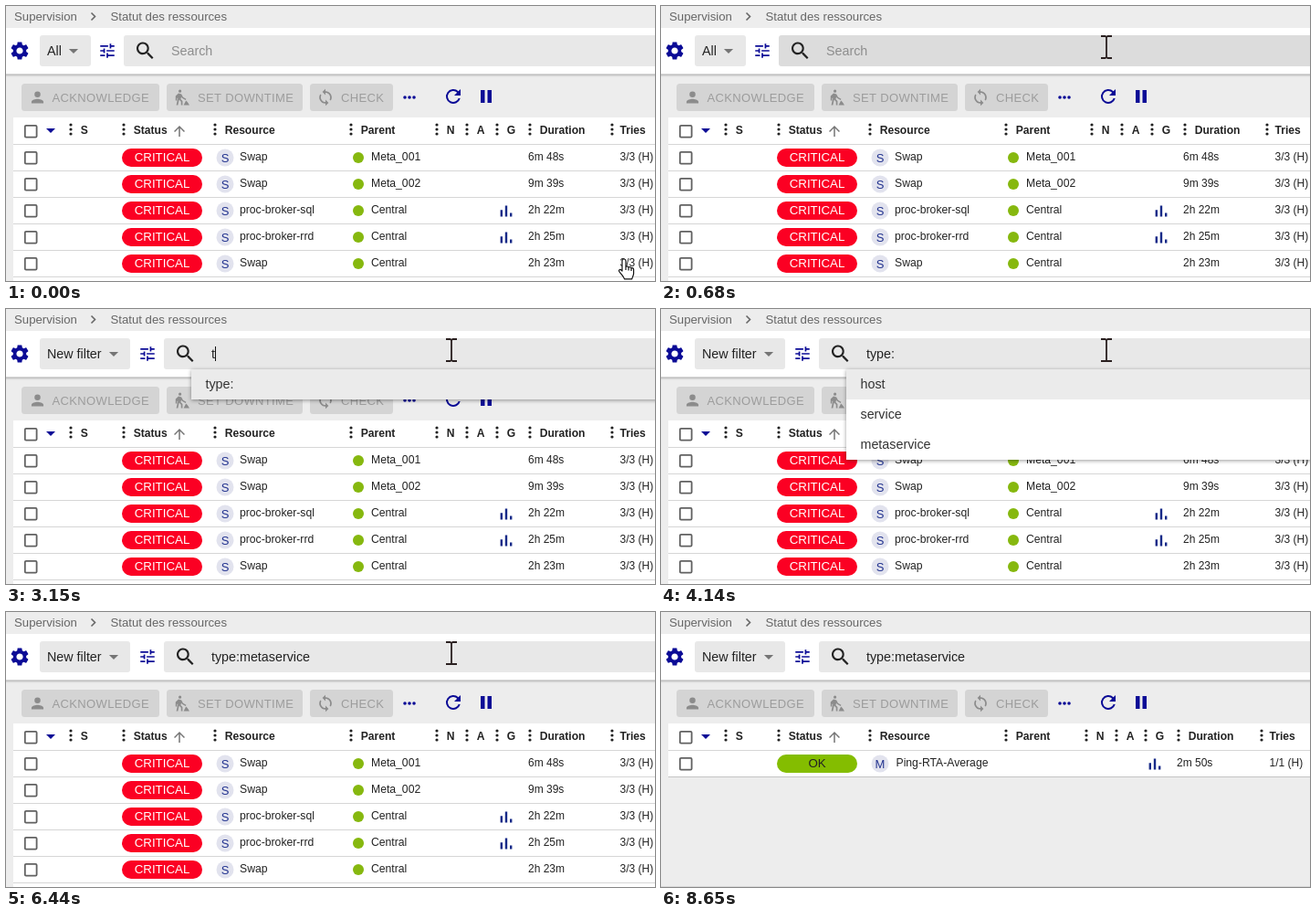
Write an HTML page that moves like this. It is 711 px wide and 301 px high and loops after 8720 ms.

```html
<!DOCTYPE html>
<html lang="fr">
<head>
<meta charset="utf-8">
<title>Statut des ressources</title>
<style>
  html, body { margin: 0; width: 100%; height: 100%; overflow: hidden; background: #ededed; }
  svg { display: block; font-family: "Liberation Sans", Arial, sans-serif; }
  text { white-space: pre; }
  .menu { filter: drop-shadow(0 1px 2px rgba(0, 0, 0, .4)); }
</style>
</head>
<body>
<svg id="stage" width="711" height="301" viewBox="0 0 711 301"></svg>
<script>
const NAVY = '#0b0b96', INK = '#222', GREEN = '#84bd00', RED = '#fb0023', FIELD = '#e8e8e8';
const LOOP = 8720;

const ICONS = {
  gear: 'M19.14 12.94c.04-.3.06-.61.06-.94 0-.32-.02-.64-.07-.94l2.03-1.58c.18-.14.23-.41.12-.61l-1.92-3.32c-.12-.22-.37-.29-.59-.22l-2.39.96c-.5-.38-1.03-.7-1.62-.94l-.36-2.54c-.04-.24-.24-.41-.48-.41h-3.84c-.24 0-.43.17-.47.41l-.36 2.54c-.59.24-1.13.57-1.62.94l-2.39-.96c-.22-.08-.47 0-.59.22L2.74 8.87c-.12.21-.08.47.12.61l2.03 1.58c-.05.3-.09.63-.09.94s.02.64.07.94l-2.03 1.58c-.18.14-.23.41-.12.61l1.92 3.32c.12.22.37.29.59.22l2.39-.96c.5.38 1.03.7 1.62.94l.36 2.54c.05.24.24.41.48.41h3.84c.24 0 .44-.17.47-.41l.36-2.54c.59-.24 1.13-.56 1.62-.94l2.39.96c.22.08.47 0 .59-.22l1.92-3.32c.12-.22.07-.47-.12-.61zM12 15.6c-1.98 0-3.6-1.62-3.6-3.6s1.62-3.6 3.6-3.6 3.6 1.62 3.6 3.6-1.62 3.6-3.6 3.6z',
  tune: 'M3 17v2h6v-2zM3 5v2h10V5zm10 16v-2h8v-2h-8v-2h-2v6zM7 9v2H3v2h4v2h2V9zm14 4v-2H11v2zm-6-4h2V7h4V5h-4V3h-2z',
  search: 'M15.5 14h-.79l-.28-.27A6.5 6.5 0 1 0 13.73 14.43l.27.28v.79l5 4.99L20.49 19zm-6 0a4.5 4.5 0 1 1 0-9 4.5 4.5 0 0 1 0 9z',
  person: 'M12 12a4 4 0 1 0 0-8 4 4 0 0 0 0 8zm0 2c-2.67 0-8 1.34-8 4v2h16v-2c0-2.66-5.33-4-8-4z',
  digger: 'M9 1.5a2 2 0 1 1 0 4 2 2 0 0 1 0-4zM7 6.5l4 1.2 2.2 4 4.3 2.4-.8 1.5-4.9-2.6-1-1.6-.8 3 2.5 2.6v5.5H10.500v-4.700l-2.7-2.600-1.600 7.300H4l2.2-10-1.2.8v3.200H3V10.200zM14 22.500l3.200-6 2 1.800 2.800 4.200z',
  sync: 'M12 4V1L8 5l4 4V6c3.31 0 6 2.69 6 6 0 1.01-.25 1.97-.7 2.8l1.46 1.46A8 8 0 0 0 12 4zm0 14c-3.31 0-6-2.69-6-6 0-1.01.25-1.97.7-2.8L5.24 7.74A8 8 0 0 0 12 20v3l4-4-4-4z',
  refresh: 'M17.65 6.35A8 8 0 1 0 19.73 14h-2.08A6 6 0 1 1 16.22 7.78L13 11h7V4z',
  pause: 'M6 19h4.500V5H6zm7.500-14v14H18V5z',
  up: 'M4 12l1.41 1.41L11 7.83V20h2V7.83l5.58 5.59L20 12l-8-8z',
  down: 'M6 9.500h12l-6 6z',
  chart: 'M4 20V11h3v9zM10.500 20V5h3v15zM17 20v-5h3v5z'
};

const stage = document.getElementById('stage');

function add(parent, tag, attrs, text) {
  const node = document.createElementNS('http://www.w3.org/2000/svg', tag);
  for (const key in attrs) node.setAttribute(key, attrs[key]);
  if (text !== undefined) node.textContent = text;
  return parent.appendChild(node);
}
const group = (parent, attrs = {}) => add(parent, 'g', attrs);
const box = (p, x, y, width, height, fill, more) => add(p, 'rect', { x, y, width, height, fill, ...more });
const dot = (p, cx, cy, r, fill) => add(p, 'circle', { cx, cy, r, fill });
const label = (p, x, y, str, size, fill = INK, more) =>
  add(p, 'text', { x, y, 'font-size': size, fill, ...more }, str);
const icon = (p, name, cx, cy, scale, fill = NAVY) =>
  add(p, 'path', { d: ICONS[name], fill, transform: `translate(${cx} ${cy}) scale(${scale}) translate(-12 -12)` });
const show = (node, on) => node.setAttribute('visibility', on ? 'visible' : 'hidden');

// Breadcrumb and filter bar
box(stage, 0, 0, 711, 301, '#ededed');
label(stage, 9, 16, 'Supervision', 13.2, '#666');
add(stage, 'path', { d: 'M93.500 7.500l4 4-4 4', fill: 'none', stroke: '#666', 'stroke-width': 1.6 });
label(stage, 114.500, 16, 'Statut des ressources', 13.2, '#666');
box(stage, 0, 24, 711, 50.500, '#fff');
['.26', '.12', '.05'].forEach((a, i) => box(stage, 0, 74.500 + i, 711, 1, `rgba(0,0,0,${a})`));
icon(stage, 'gear', 15, 49, 1);

const select = box(stage, 37, 32, 56, 34, FIELD, { rx: 3 });
const filterName = label(stage, 45, 54, 'All', 14.300);
const filterArrow = group(stage);
icon(filterArrow, 'down', 74, 49, .85, '#757575');
const bar = group(stage);
icon(bar, 'tune', 111, 49, .86);
const field = box(bar, 129, 32, 590, 34, FIELD, { rx: 3 });
icon(bar, 'search', 152.500, 49, 1.06, INK);
const query = label(bar, 181, 54, '', 14.300);
const caret = box(stage, 181, 41, 1, 16, '#111');

// Action buttons
[[17, 151, 'person', 34.500, 'ACKNOWLEDGE', 50.500, .82],
 [176, 149, 'digger', 193, 'SET DOWNTIME', 210, .8],
 [333, 91, 'sync', 350, 'CHECK', 367, .85]].forEach(([x, w, name, ix, str, tx, scale]) => {
  box(stage, x, 85, w, 30, '#d4d4d4', { rx: 3.500 });
  icon(stage, name, ix, 100, scale, '#8c8c8c');
  label(stage, tx, 104.500, str, 13, '#9c9c9c', { 'letter-spacing': .37 });
});
[437, 442, 447].forEach(x => dot(stage, x, 100, 1.8, NAVY));
icon(stage, 'refresh', 490, 99, 1);
icon(stage, 'pause', 526, 99, 1);

// Tables: the right-hand columns sit further left when filtered
function checkbox(p, y) {
  box(p, 20.800, y - 6.200, 12.800, 12.800, 'none', { rx: 1.200, stroke: '#616161', 'stroke-width': 1.800 });
}

function table(rows, cols) {
  const g = group(stage), [n, a, gr, dur, tries] = cols;
  box(g, 8, 122, 703, rows.length > 1 ? 179 : 59, '#fff');
  checkbox(g, 137);
  add(g, 'path', { d: 'M44 134h10l-5 5z', fill: NAVY });
  [[71, 'S'], [129, 'Status'], [229, 'Resource'], [378, 'Parent'], [n, 'N'], [a, 'A'],
   [gr, 'G'], [dur, 'Duration'], [tries, 'Tries']].forEach(([x, str]) => {
    [130, 135, 140].forEach(y => dot(g, x, y, 1.600, INK));
    label(g, x + (x > 650 ? 8.500 : 10.700), 140, str, 12.100, INK, { 'font-weight': 'bold' });
  });
  icon(g, 'up', 190, 137, .75, '#757575');
  rows.forEach(([status, kind, name, parent, chart, time, count], i) => {
    const y = 166 + i * 29;
    box(g, 8, y - 15, 703, 1, '#d6d6d6');
    checkbox(g, y);
    box(g, 127, y - 10, 88, 20, status === 'OK' ? GREEN : RED, { rx: 10 });
    label(g, 171, y + 4, status, 13.300, status === 'OK' ? INK : '#fff', { 'text-anchor': 'middle' });
    dot(g, 240, y, 9.500, '#e2e3ee');
    label(g, 240, y + 4.500, kind, 13, '#22338f', { 'text-anchor': 'middle' });
    label(g, parent ? 256 : 257.500, y + 2.500, name, 12.200);
    if (parent) {
      dot(g, 386, y, 6, '#86b80f');
      label(g, 400, y + 2.500, parent, 12.200);
    }
    if (chart) icon(g, 'chart', gr + 10, y, .8, '#172a88');
    label(g, dur - 2, y + 2.500, time, 12);
    label(g, tries + 8.500, y + 2.500, count, 12);
  });
  box(g, 8, 151 + rows.length * 29, 703, 1, rows.length > 1 ? '#d6d6d6' : '#c4c4c4');
  return g;
}

const alert = (name, parent, chart, time) => ['CRITICAL', 'S', name, parent, chart, time, '3/3 (H)'];
const fullTable = table([
  alert('Swap', 'Meta_001', false, '6m 48s'),
  alert('Swap', 'Meta_002', false, '9m 39s'),
  alert('proc-broker-sql', 'Central', true, '2h 22m'),
  alert('proc-broker-rrd', 'Central', true, '2h 25m'),
  alert('Swap', 'Central', false, '2h 23m')
], [472, 505, 538, 574, 664]);
const shortTable = table([
  ['OK', 'M', 'Ping-RTA-Average', '', true, '2m 50s', '1/1 (H)']
], [466, 499, 531, 567, 658]);
box(shortTable, 0, 300, 711, 1, '#d8d8d8');

// Suggestion list
function suggestions(items) {
  const g = group(stage, { class: 'menu' });
  box(g, 203, 66, 530, items.length * 33, '#fff');
  const mark = box(g, 203, 66, 530, 33, '#ebebeb');
  items.forEach((str, i) => label(g, 218.500, 87 + i * 33, str, 14.300, '#333'));
  return { g, mark };
}
const menus = [['type:'], ['host', 'service', 'metaservice'], [',host', ',service']].map(suggestions);

// Pointers, hot spot at 0,0
const pointers = {
  beam: group(stage),
  hand: group(stage),
  arrow: group(stage)
};
add(pointers.beam, 'path', {
  d: 'M-6-12h4.500L0-11 1.500-12H6M0-11V11M-6 12h4.500L0 11 1.500 12H6', fill: 'none', stroke: '#2a2020', 'stroke-width': 1.800
});
add(pointers.hand, 'path', {
  d: 'M-2 2a2 2 0 0 1 4 0v6.500a1.800 1.800 0 0 1 3 .6 1.800 1.800 0 0 1 3 1 1.600 1.600 0 0 1 2.600 1.200v4.500c0 2.200-1.400 3.400-1.900 6H.5C0 19.500-2.500 17-5.200 13.600c-1-1.600.9-3 2.200-1.600l1 1zM2 8v4M5 9v3.500M8 10v3',
  fill: '#fff', stroke: '#111', 'stroke-width': 1.200, 'stroke-linejoin': 'round'
});
add(pointers.arrow, 'path', {
  d: 'M0 0v17l4-3.700 2.600 6 2.600-1.100-2.600-5.900H12z', fill: '#fff', stroke: '#111', 'stroke-width': 1
});

// Timeline tables: [ms, values...]
const TYPED = [[0, 'Search', 181], [1940, 't', 229], [3220, 'type:', 256], [5170, 'type:metaservice', 332]];
const CARET = [[880, 1410], [1940, 2490], [3020, 3750], [4280, 4820], [5170, 5680], [6160, 6440]];
const MENU = [[0, -1, 0], [1940, 0, 0], [3220, 1, 0], [4210, 1, 1], [4540, 1, 2], [5170, 2, 0], [6440, -1, 0]];
const SHADE = [[0, 232], [470, 232], [670, 220], [880, 220], [1010, 232], [6440, 232], [6640, 220], [8030, 220], [8230, 232]];
const PATH = [[70, 677, 277], [540, 490, 35], [680, 488, 45], [7970, 488, 45], [8380, 668, 312]];

const stepAt = (list, t) => list.filter(s => s[0] <= t).pop();
const smooth = u => u * u * (3 - 2 * u);

function tween(list, t, ease = u => u) {
  const i = list.findIndex(s => s[0] > t);
  if (i < 0) return list[list.length - 1].slice(1);
  if (i === 0) return list[0].slice(1);
  const a = list[i - 1], b = list[i], u = ease((t - a[0]) / (b[0] - a[0]));
  return a.slice(1).map((v, k) => v + (b[k + 1] - v) * u);
}

function render(t) {
  const edited = t >= 1940, filtered = t >= 6590;

  select.setAttribute('width', edited ? 99 : 56);
  filterName.textContent = edited ? 'New filter' : 'All';
  filterArrow.setAttribute('transform', `translate(${edited ? 44 : 0} 0)`);
  bar.setAttribute('transform', `translate(${edited ? 44 : 0} 0)`);
  const shade = Math.round(tween(SHADE, t)[0]);
  field.setAttribute('fill', `rgb(${shade},${shade},${shade})`);

  const [, str, caretX] = stepAt(TYPED, t);
  query.textContent = str;
  query.setAttribute('fill', edited ? INK : '#8d8d8d');
  caret.setAttribute('x', caretX);
  show(caret, CARET.some(([on, off]) => t >= on && t < off));

  show(fullTable, !filtered);
  show(shortTable, filtered);
  const [, open, row] = stepAt(MENU, t);
  menus.forEach(({ g, mark }, i) => {
    show(g, i === open);
    mark.setAttribute('y', 66 + row * 33);
  });

  const [x, y] = tween(PATH, t, smooth);
  const overRows = y > 152 && y < (filtered ? 181 : 296);
  const kind = y > 32 && y < 66 ? 'beam' : overRows ? 'hand' : 'arrow';
  for (const name in pointers) {
    show(pointers[name], name === kind && t < 8380);
    pointers[name].setAttribute('transform', `translate(${x.toFixed(1)} ${y.toFixed(1)})`);
  }
}

const start = performance.now();
function tick() {
  render((performance.now() - start) % LOOP);
  requestAnimationFrame(tick);
}
tick();
</script>
</body>
</html>
```
